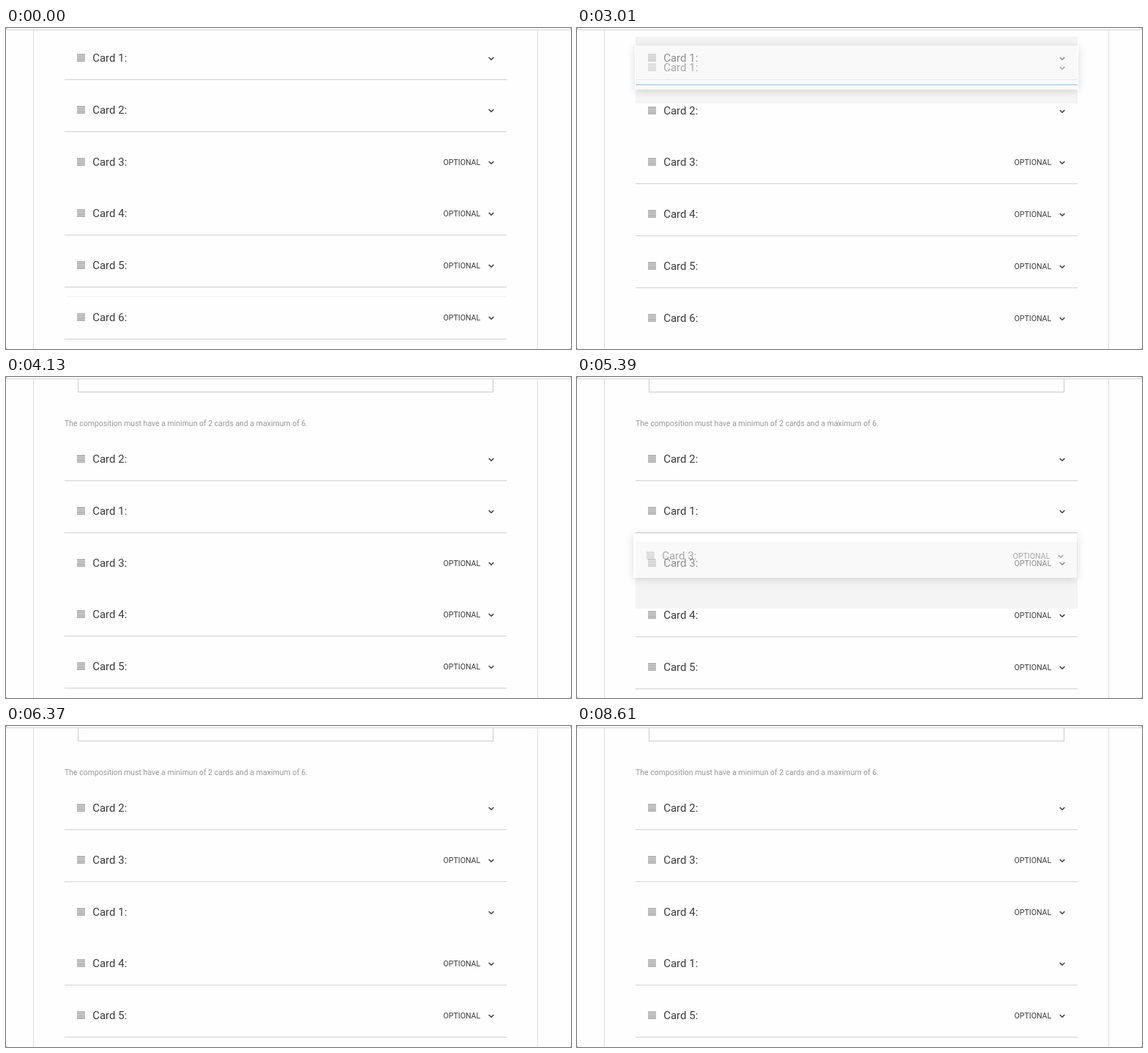
An HTML page with a canvas that plays this animation: 772 by 438 pixels, repeating every 9870 ms.

```html
<!DOCTYPE html>
<html lang="en">
<head>
<meta charset="utf-8">
<title>Sortable cards</title>
<style>
  html, body { margin: 0; width: 100%; height: 100%; overflow: hidden; background: #777; }
  canvas { display: block; border-radius: 2px; }
</style>
</head>
<body>
<canvas id="stage" width="772" height="438"></canvas>
<script>
const ctx = document.getElementById('stage').getContext('2d');
const LOOP = 9870, STEP = 70, PITCH = 70.75;

// Card order and position of the first row, from each time on
const layouts = [
  { at: 0,    top: 41,  order: [1, 2, 3, 4, 5, 6] },
  { at: 4060, top: 41,  order: [2, 1, 3, 4, 5, 6] },
  { at: 4130, top: 112, order: [2, 1, 3, 4, 5, 6] },
  { at: 6370, top: 112, order: [2, 3, 1, 4, 5, 6] },
  { at: 8610, top: 112, order: [2, 3, 4, 1, 5, 6] },
];

// dy runs from first to last value between start and end; the card is held until drop
const drags = [
  { start: 3010, end: 3780, drop: 4060, card: 1, dx: 0,  dy: [13, 95],    power: 1,   lineAt: 3010 },
  { start: 5390, end: 5950, drop: 6370, card: 3, dx: -2, dy: [-10, -93],  power: .54, lineAt: 5740 },
  { start: 7700, end: 8190, drop: 8610, card: 4, dx: -1, dy: [-13, -103], power: .95, lineAt: 7700 },
];

function rect(x, y, w, h, color) {
  ctx.fillStyle = color;
  ctx.fillRect(x, y, w, h);
}

function text(string, x, y, size, color) {
  ctx.font = `${size}px Roboto, sans-serif`;
  ctx.fillStyle = color;
  ctx.fillText(string, x, y);
}

function drawRow(card, x, y) {
  for (let i = 0; i < 5; i++) rect(x + 97, y - 5.5 + i * 2.2, 11, 1.4, '#999');
  text(`Card ${card}:`, x + 118.2, y + 5.3, 15, '#3c3c3c');
  if (card > 2) text('OPTIONAL', x + 597.5, y + 3.5, 10.6, '#3c3c3c');
  ctx.strokeStyle = '#3c3c3c';
  ctx.lineWidth = 1.5;
  ctx.beginPath();
  ctx.moveTo(x + 659.7, y - 1);
  ctx.lineTo(x + 663, y + 2.2);
  ctx.lineTo(x + 666.3, y - 1);
  ctx.stroke();
}

function drawPage(scrolled) {
  rect(0, 0, 772, 438, '#fefefe');
  rect(37, 3, 1, 435, '#dcdcdc');
  rect(726, 3, 1, 435, '#dcdcdc');
  rect(0, 2, 772, 1, '#d4d4d4');
  if (!scrolled) return;
  rect(98, 3, 1, 18, '#ccc');
  rect(665, 3, 1, 18, '#ccc');
  rect(98, 20, 568, 1, '#ccc');
  text('The composition must have a minimun of 2 cards and a maximum of 6.', 80, 67, 10.5, '#999');
}

function drawFloatingCard(card, dx, y, alpha) {
  const x = 79 + dx, top = y - 30;
  ctx.save();
  ctx.globalAlpha = alpha;

  // Shadow only outside the card, so that it does not tint the translucent face
  ctx.save();
  ctx.beginPath();
  ctx.rect(0, 0, 772, 438);
  ctx.rect(x, top, 606, 60);
  ctx.clip('evenodd');
  ctx.shadowColor = 'rgba(0,0,0,.35)';
  ctx.shadowBlur = 11;
  ctx.shadowOffsetY = 2;
  rect(x, top, 606, 60, '#fff');
  ctx.restore();

  rect(x, top, 606, 60, '#fff');
  drawRow(card, dx, y);
  ctx.restore();
}

function draw(time) {
  const t = Math.floor((time % LOOP) / STEP) * STEP;
  const { top, order } = layouts.filter(l => l.at <= t).pop();
  const drag = drags.find(d => t >= d.start && t < d.drop);
  let hovered = order.length, source, y;

  if (drag) {
    const p = Math.min(1, (t - drag.start) / (drag.end - drag.start));
    const [from, to] = drag.dy;
    source = order.indexOf(drag.card);
    y = Math.round(top + source * PITCH + from + (to - from) * p ** drag.power);
    hovered = Math.round((y - top) / PITCH);
  }

  drawPage(top > 41);
  if (t < 3010) rect(83, 366, 601, 1, '#f1f1f1');
  if (drag) {
    const center = Math.round(top + hovered * PITCH);
    rect(80, center - 29, 604, hovered === source ? 91 : 86, '#f4f4f4');
    if (t >= drag.lineAt) rect(80, center + 36, 604, 1, '#4a94bd');
  }

  order.forEach((card, i) => {
    const exact = top + i * PITCH + (i > hovered ? .75 : 0);
    const center = Math.round(exact);
    drawRow(card, 0, center);
    // Hairlines that land on a half pixel vanish
    if (exact % 1 !== .5) rect(80, center + 29, 604, 1, '#d2d2d2');
  });

  if (drag) drawFloatingCard(drag.card, drag.dx, y, t === drag.start ? .42 : .9);
}

function tick() {
  draw(performance.now());
  requestAnimationFrame(tick);
}
document.fonts.ready.then(tick);
</script>
</body>
</html>
```
